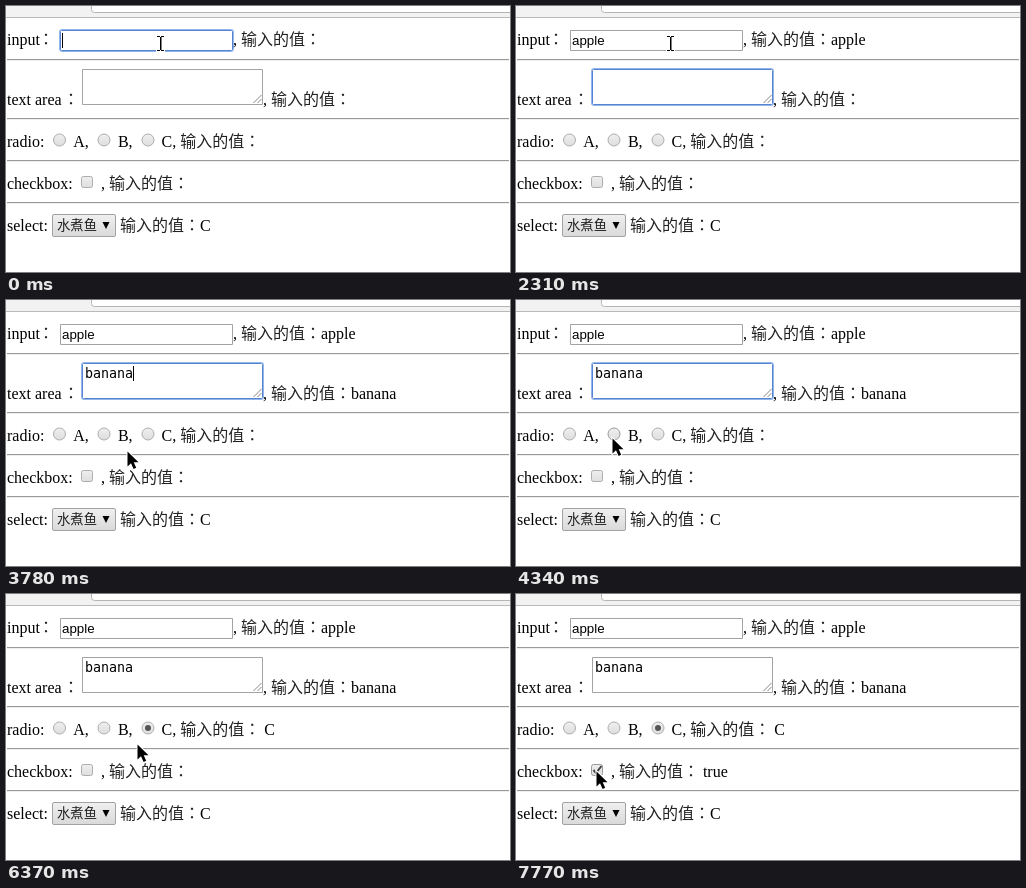
Animation, 504 px wide and 266 px high, one loop 8000 ms. Source, as an HTML page with a canvas:

```html
<!DOCTYPE html>
<html lang="zh">
<head>
<meta charset="utf-8">
<title>Form binding</title>
<style>
html, body { margin: 0; width: 100%; height: 100%; overflow: hidden; background: #fff; }
canvas { display: block; }
</style>
</head>
<body>
<canvas id="stage" width="504" height="266"></canvas>
<script>
const ctx = document.getElementById('stage').getContext('2d');
const LOOP = 8000, TICK = 70;
const SERIF = '16px "Liberation Serif", serif';
const SANS = '13.333px "Liberation Sans", sans-serif';
const MONO = '13.333px "DejaVu Sans Mono", monospace';
const han = size => `300 ${size}px "Noto Sans CJK SC", sans-serif`;
const COLON = '16px "Noto Sans CJK TC", sans-serif';

// Times at which each letter appears
const FRUIT = [420, 630, 770, 980, 1120];
const SNACK = [2450, 2590, 2800, 2940, 3150, 3360];

// Pointer way-points: time, x, y
const PATH = [
  [3640, 154, 37], [3710, 145, 92], [3780, 121, 151], [3920, 108, 171],
  [4060, 104, 165], [4340, 96, 138], [5110, 96, 138], [5390, 128, 136],
  [5670, 142, 138], [6230, 142, 138], [6720, 103, 179], [6860, 91, 177],
  [6930, 91, 177], [7000, 86, 180], [7350, 80, 177]
];

function text(str, x, y, font = SERIF, color = '#000') {
  ctx.font = font;
  ctx.fillStyle = color;
  ctx.fillText(str, x, y);
}

function rect(x, y, w, h, color) {
  ctx.fillStyle = color;
  ctx.fillRect(x, y, w, h);
}

function line(points, color, width) {
  ctx.beginPath();
  points.forEach(([x, y]) => ctx.lineTo(x, y));
  ctx.strokeStyle = color;
  ctx.lineWidth = width;
  ctx.stroke();
}

function shade(y, h, top, bottom) {
  const g = ctx.createLinearGradient(0, y, 0, y + h);
  g.addColorStop(0, top);
  g.addColorStop(1, bottom);
  return g;
}

function roundBox(x, y, w, h, r, fill, stroke, width = 1) {
  ctx.beginPath();
  ctx.roundRect(x, y, w, h, r);
  if (fill) {
    ctx.fillStyle = fill;
    ctx.fill();
  }
  ctx.strokeStyle = stroke;
  ctx.lineWidth = width;
  ctx.stroke();
}

function valueLabel(x, y) {
  text('输入的值', x, y, han(16), '#222');
  text('：', x + 64, y, COLON, '#222');
}

function field(x, y, w, h, focused) {
  rect(x, y, w, h, '#fff');
  if (focused) {
    roundBox(x - 0.5, y - 0.5, w + 1, h + 1, 2, null, 'rgba(77,132,220,.6)');
    roundBox(x + 0.5, y + 0.5, w - 1, h - 1, 1, null, '#5585d2');
  } else {
    roundBox(x + 0.5, y + 0.5, w - 1, h - 1, 0, null, '#a3a3a3');
  }
}

function radio(x, checked, pressed, hover) {
  const y = 134;
  ctx.beginPath();
  ctx.arc(x, y, 6, 0, Math.PI * 2);
  ctx.fillStyle = pressed ? shade(y - 6, 12, '#d4d4d4', '#e2e2e2') : shade(y - 6, 12, '#efefef', '#dedede');
  ctx.fill();
  ctx.strokeStyle = hover ? '#999' : '#adadad';
  ctx.lineWidth = 1;
  ctx.stroke();
  if (!checked) return;
  ctx.beginPath();
  ctx.arc(x, y, 3, 0, Math.PI * 2);
  ctx.fillStyle = '#555';
  ctx.fill();
}

function checkbox(checked, pressed, hover) {
  const fill = pressed ? shade(170, 12, '#d4d4d4', '#e2e2e2') : shade(170, 12, '#efefef', '#dedede');
  roundBox(75.5, 170.5, 11, 11, 2, fill, hover ? '#999' : '#adadad');
  if (checked) line([[77.5, 176], [80, 179], [85.5, 172]], '#444', 2);
}

function select() {
  roundBox(46.5, 208.5, 63, 22, 1.5, shade(208, 22, '#f0f0f0', '#dadada'), '#a2a2a2');
  text('水煮鱼', 51, 224, han(13.333), '#222');
  ctx.beginPath();
  ctx.moveTo(96.5, 216);
  ctx.lineTo(103.5, 216);
  ctx.lineTo(100, 223);
  ctx.fillStyle = '#000';
  ctx.fill();
}

function toolbar() {
  rect(0, 0, 504, 11, '#f2f2f2');
  rect(0, 11, 504, 1, '#b9b9b9');
  roundBox(85.5, -12, 440, 18.5, 3, '#fff', '#b4b4b4');
}

function pointerAt(t) {
  const i = PATH.findIndex(p => p[0] > t);
  if (i === 0) return PATH[0].slice(1);
  if (i < 0) return PATH[PATH.length - 1].slice(1);
  const [t0, x0, y0] = PATH[i - 1], [t1, x1, y1] = PATH[i];
  const k = (t - t0) / (t1 - t0);
  return [Math.round(x0 + (x1 - x0) * k), Math.round(y0 + (y1 - y0) * k)];
}

const within = (v, a, b) => v >= a && v <= b;

function overText(x, y) {
  if (within(y, 24, 45) || within(y, 63, 99)) return true;
  if (within(y, 125, 146)) return ![53.5, 98, 142].some(c => Math.abs(x - c) < 7);
  return within(y, 167, 187) && !within(x, 75, 87);
}

function pointer(x, y) {
  ctx.save();
  ctx.translate(x, y);
  if (overText(x, y)) {
    rect(-4, -8, 9, 3, '#fff');
    rect(-4, 6, 9, 3, '#fff');
    rect(-1, -7, 3, 15, '#fff');
    rect(-3, -7, 3, 1, '#000');
    rect(1, -7, 3, 1, '#000');
    rect(-3, 7, 3, 1, '#000');
    rect(1, 7, 3, 1, '#000');
    rect(0, -6, 1.5, 13, '#000');
  } else {
    const shape = new Path2D('M.5 .5V15.5L4 12.2L6.6 18L9.2 16.8L6.7 11.3H11.5Z');
    ctx.strokeStyle = '#fff';
    ctx.lineWidth = 2;
    ctx.stroke(shape);
    ctx.fillStyle = '#000';
    ctx.fill(shape);
  }
  ctx.restore();
}

function draw(t) {
  const typed = (word, times) => word.slice(0, times.filter(s => s <= t).length);
  const during = (a, b) => t >= a && t < b;
  const fruit = typed('apple', FRUIT), snack = typed('banana', SNACK);
  const choice = t >= 6160 ? 'C' : t >= 5040 ? 'B' : '';
  const ticked = t >= 7770;
  const [px, py] = pointerAt(t);

  rect(0, 0, 504, 266, '#fff');
  toolbar();
  for (const y of [53, 112, 154, 196]) {
    rect(1, y, 502, 1, '#9a9a9a');
    rect(1, y + 1, 502, 1, '#eee');
  }

  text('input', 1, 39);
  text('：', 32, 39, COLON, '#222');
  field(54, 24, 173, 21, t < 1540);
  text(fruit, 56, 39, SANS);
  if (t < 280 || during(420, 1540)) rect(56 + Math.round(ctx.measureText(fruit).width), 27, 1, 15, '#000');
  text(',', 227, 39);
  valueLabel(235, 39);
  text(fruit, 315, 39);

  text('text area', 1, 99);
  text('：', 57, 99, COLON, '#222');
  field(76, 63, 181, 36, during(1540, 4900));
  line([[247.5, 97], [255.5, 89]], '#888', 1);
  line([[251.5, 97], [255.5, 93]], '#888', 1);
  text(snack, 79, 78, MONO);
  if (during(1540, 2310) || during(2450, 3850)) rect(79 + Math.floor(ctx.measureText(snack).width), 66, 1, 15, '#000');
  text(',', 257, 99);
  valueLabel(265, 99);
  text(snack, 345, 99);

  text('radio:', 1, 141);
  [['A', 53.5, 67.3], ['B', 98, 111.9], ['C', 142, 155.6]].forEach(([name, cx, tx]) => {
    const pressed = name === 'B' && during(4900, 5040) || name === 'C' && during(6020, 6160);
    radio(cx, choice === name, pressed, Math.hypot(px - cx, py - 134) < 7);
    text(name + ',', tx, 141);
  });
  valueLabel(174.2, 141);
  text(choice, 258.2, 141);

  text('checkbox:', 1, 183);
  checkbox(ticked, during(7630, 7770), within(px, 75, 87) && within(py, 170, 182));
  text(',', 94.9, 183);
  valueLabel(102.9, 183);
  if (ticked) text('true', 186.9, 183);

  text('select:', 1, 225);
  select();
  valueLabel(114, 225);
  text('C', 194, 225);

  pointer(px, py);
}

function tick(now) {
  draw(Math.floor(now % LOOP / TICK) * TICK);
  requestAnimationFrame(tick);
}
requestAnimationFrame(tick);
</script>
</body>
</html>
```
